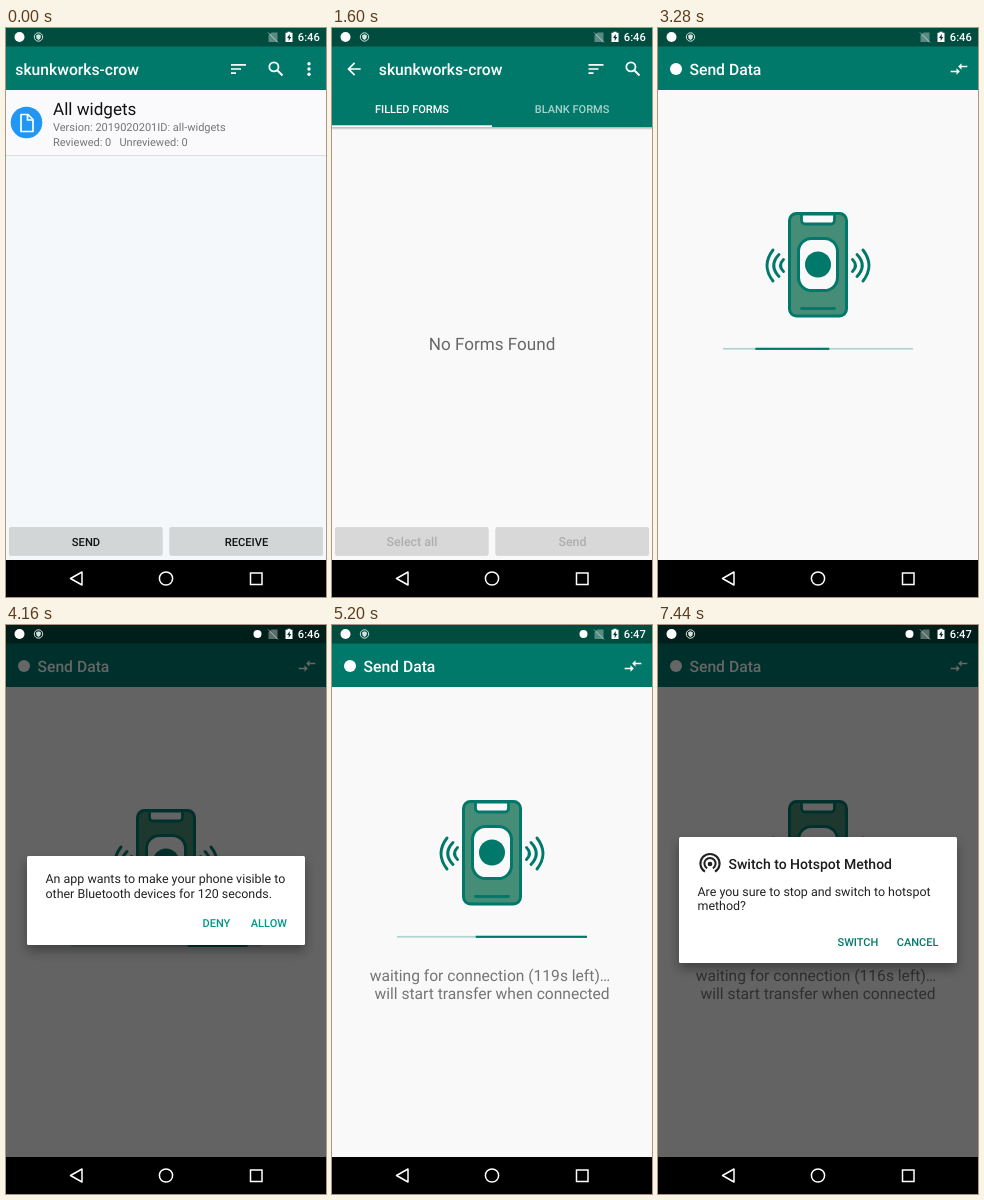
An HTML page that plays this animation: 320x569 px, repeating every 8000 ms.

```html
<!DOCTYPE html>
<html lang="en">
<head>
<meta charset="utf-8">
<title>Send Data</title>
<style>
  html, body { margin: 0; width: 100%; height: 100%; overflow: hidden; background: #000; }
  svg { display: block; }
  #stage { width: 100%; height: 100%; }
  text { font-family: Roboto, sans-serif; white-space: pre; text-rendering: geometricPrecision; }
</style>
</head>
<body>
<svg id="stage" viewBox="0 0 320 569"></svg>
<script>
const LOOP = 8000, STEP = 80;
const TEAL = '#00796b', PHONE = '#468d77';

// ---- markup helpers ----
const text = (x, y, size, str, fill, more = '') =>
  `<text x="${x}" y="${y}" font-size="${size}" fill="${fill}" ${more}>${str}</text>`;
const box = (x, y, w, h, fill, more = '') =>
  `<rect x="${x}" y="${y}" width="${w}" height="${h}" fill="${fill}" ${more}/>`;
const dot = (x, y, r, fill, more = '') =>
  `<circle cx="${x}" cy="${y}" r="${r}" fill="${fill}" ${more}/>`;
const line = (d, color, w, more = '') =>
  `<path d="${d}" fill="none" stroke="${color}" stroke-width="${w}" ${more}/>`;
const group = (id, body, more = '') => `<g id="${id}" ${more}>${body}</g>`;
const MID = 'text-anchor="middle"', BOLD = 'font-weight="500"';
const CENTER = `${MID} ${BOLD}`, ROUND = 'stroke-linecap="round"';

// 24-unit icons drawn at 20 px around a centre
const icon = (x, y, body) =>
  `<g transform="translate(${x - 10} ${y - 10}) scale(.833)">${body}</g>`;
const sortIcon = x => icon(x, 41, '<path fill="#fff" d="M3 18h6v-2H3zM3 6v2h18V6zM3 13h12v-2H3z"/>');
const searchIcon = x => icon(x, 41,
  dot(9.5, 9.5, 5.5, 'none', 'stroke="#fff" stroke-width="2.1"') + line('M13.8 13.8L19.8 19.8', '#fff', 2.3));
const swapIcon = icon(301, 41,
  '<path fill="#fff" d="M9 14H2v2h7v3l4-4-4-4zM15 13v-3h7V8h-7V5l-4 4z"/>');
const backIcon = icon(22, 41,
  '<path fill="#fff" d="M20 11H7.8l5.6-5.6L12 4l-8 8 8 8 1.4-1.4L7.8 13H20z"/>');

const barTitle = (x, str) => text(x, 46.5, 15.7, str, '#fff', BOLD);
const button = (id, x, label, size, fill, color) =>
  box(x, 499.5, 153.5, 28.5, '#000', 'rx="2" opacity=".12"') +
  box(x, 499, 153.5, 28, fill, 'rx="2"') +
  text(x + 77, 517.6, size, label, color, `${CENTER} id="${id}Text"`) +
  box(x, 499, 153.5, 28, '#000', `rx="2" opacity="0" id="${id}Press"`);

const formCard = y =>
  box(0, y, 320, 65, '#fafafd') + box(0, y + 65, 320, 1, '#dcdde0') +
  dot(20.5, y + 32.5, 15.8, '#2196f3') +
  line(`M15 ${y + 24.5}h7l5 5v12h-12zM21.5 ${y + 24.5}v5.500h5.500`, '#fff', 1.7, 'stroke-linejoin="round"') +
  text(47, y + 25, 17.1, 'All widgets', '#111') +
  text(47, y + 41, 11, 'Version: 2019020201ID: all-widgets', '#757575');

// ---- screens ----
const home = box(0, 18, 320, 514, '#f4f8fa') + box(0, 18, 320, 44, TEAL) +
  barTitle(9.3, 'skunkworks-crow') + sortIcon(232.5) + searchIcon(270) +
  [35.8, 41, 46.200].map(y => dot(303, y, 1.7, '#fff')).join('') +
  formCard(62) + text(47, 118, 11, 'Reviewed: 0   Unreviewed: 0', '#757575') +
  button('homeSend', 3, 'SEND', 11.2, '#d3d6d7', '#111') +
  button('receive', 163.5, 'RECEIVE', 11.2, '#d3d6d7', '#111');

const forms = box(0, 18, 320, 514, '#f9f9f9') +
  group('pages',
    text(160, 322, 17.1, 'No Forms Found', '#686868', MID) +
    `<g transform="translate(320)">${formCard(99)}` +
    box(288.5, 125.500, 13, 13, 'none', 'rx="1.5" stroke="#757575" stroke-width="1.8" id="unchecked"') +
    group('checked', box(287.5, 124.500, 15, 15, '#009688', 'rx="2"') +
      line('M290.500 132l3.300 3.300 6-6.500', '#fff', 1.8)) + '</g>') +
  box(0, 99, 320, 3, 'url(#shade)') + box(0, 18, 320, 81, TEAL) +
  backIcon + barTitle(46.8, 'skunkworks-crow') + sortIcon(264) + searchIcon(301) +
  text(80, 85.2, 11, 'FILLED FORMS', '#fff', `${CENTER} id="filled"`) +
  text(240, 85.2, 11, 'BLANK FORMS', '#fff', `${CENTER} id="blank"`) +
  box(0, 97.3, 160, 1.8, '#fff', 'id="tab"') +
  button('all', 3, 'Select all', 12.44, '#d8d8d8', '#aeaeae') +
  button('formSend', 163.5, 'Send', 12.44, '#d8d8d8', '#aeaeae');

const waves = ['M205 222Q217 237.500 205 253', 'M199 226.500Q209.500 237.500 199 248.500', 'M194.500 231.500Q200.500 237.500 194.500 243.500']
  .map(d => line(d, TEAL, 2.9, ROUND)).join('');
const edge = w => `stroke="${TEAL}" stroke-width="${w}"`;
const phone = waves + `<g transform="translate(320) scale(-1 1)">${waves}</g>` +
  box(131.5, 185.5, 57, 102.5, PHONE, `rx="7" ${edge(3)}`) +
  `<path d="M143.500 186v6q0 4 4 4h25q4 0 4-4v-6z" fill="#f9f9f9" ${edge(2.8)}/>` +
  box(140.5, 210.5, 39, 52, '#f9f9f9', `rx="13" ${edge(3)}`) +
  dot(160, 236.5, 13, TEAL) + line('M143.500 280.500h33', TEAL, 2.8, ROUND) +
  `<svg x="65" y="319.500" width="190" height="2.400">${box(0, .3, 190, 1.8, '#b0d3cf')}` +
  box(0, 0, 0, 2.4, TEAL, 'id="bar1"') + box(0, 0, 0, 2.4, TEAL, 'id="bar2"') + '</svg>';

const send = box(0, 18, 320, 514, '#f9f9f9') + box(0, 18, 320, 44, TEAL) +
  dot(18, 41, 6, '#fff') + barTitle(31.5, 'Send Data') +
  dot(301, 41, 16, '#fff', 'id="swapPress" opacity="0"') + swapIcon + group('phone', phone) +
  group('wait', text(37.7, 356.3, 15.6, '', '#757575', 'id="count"') +
    text(42.5, 374.3, 15.6, 'will start transfer when connected', '#757575'));

const panel = (y, h) => box(21, y, 278, h, '#fff', 'rx="1.5" filter="url(#shadow)"');
const visibleDialog = panel(231, 89) +
  text(39.5, 258, 12.44, 'An app wants to make your phone visible to', '#222') +
  text(39.5, 272.6, 12.44, 'other Bluetooth devices for 120 seconds.', '#222') +
  box(238, 286, 50, 25, '#000', 'rx="2" opacity="0" id="allowPress"') +
  text(196.5, 302.4, 11, 'DENY', '#009688', BOLD) + text(244.8, 302.4, 11, 'ALLOW', '#009688', BOLD);

const ring = (r, cut) => {
  const x = r * Math.sin(cut), y = r * Math.cos(cut);
  return line(`M${52 - x} ${238.5 + y}A${r} ${r} 0 1 1 ${52 + x} ${238.5 + y}`, '#222', 2);
};
const switchDialog = panel(212, 126) + ring(9.6, .55) + ring(5.6, .55) + dot(52, 239, 2.3, '#222') +
  text(70.5, 244, 14, 'Switch to Hotspot Method', '#1c1c1c', BOLD) +
  text(39.5, 270.6, 12.44, 'Are you sure to stop and switch to hotspot', '#222') +
  text(39.5, 285.2, 12.44, 'method?', '#222') +
  text(179.5, 320.6, 11, 'SWITCH', TEAL, BOLD) + text(238.8, 320.6, 11, 'CANCEL', TEAL, BOLD);

const status = dot(13.5, 9, 5, '#fff') +
  dot(32.5, 9, 4.2, 'none', 'stroke="#d5e2df" stroke-width="1"') +
  '<path d="M32.500 6.300l2.300.9v1.700q0 2-2.300 3-2.300-1-2.300-3V7.200z" fill="#d5e2df"/>' +
  dot(251.5, 9, 4, '#fff', 'id="link"') +
  '<path d="M265.500 4.500h6v9.500h-9V7.500z" fill="#fff" opacity=".35"/>' +
  line('M262 4.500l10 10', '#fff', 1, 'opacity=".55"') +
  '<path d="M281.500 3.800h3v1h2V14h-7V4.800h2z" fill="#fff"/>' +
  '<path d="M283.700 6l-2.600 3.900h1.600v3l2.500-4h-1.500z" fill="#00352c"/>' +
  text(291.8, 13.2, 11.2, '', '#fff', `${BOLD} id="clock"`);

const nav = box(0, 532, 320, 37, '#000') +
  line('M76 544v13l-11.500-6.500z', '#fff', 1.5, 'stroke-linejoin="round"') +
  dot(160, 550.5, 6.6, 'none', 'stroke="#fff" stroke-width="1.5"') +
  box(244.5, 545, 11.5, 11.5, 'none', 'stroke="#fff" stroke-width="1.5"');

document.getElementById('stage').innerHTML =
  `<defs>
    <linearGradient id="shade" x2="0" y2="1"><stop stop-opacity=".3"/><stop offset="1" stop-opacity="0"/></linearGradient>
    <filter id="shadow" x="-15%" y="-25%" width="130%" height="160%">
      <feDropShadow dx="0" dy="6" stdDeviation="6" flood-opacity=".35"/></filter>
  </defs>` +
  group('home', home) + group('forms', forms) + group('send', send) + box(0, 0, 320, 18.5, '#004d40') +
  box(0, 0, 320, 532, '#000', 'id="dim"') +
  group('visible', visibleDialog) + group('switch', switchDialog) + status + nav;

// ---- motion ----
const el = {};
document.querySelectorAll('[id]').forEach(n => el[n.id] = n);
const set = (id, name, value) => el[id].setAttribute(name, value);
const show = (id, alpha) => {
  set(id, 'opacity', alpha);
  set(id, 'visibility', alpha > 0 ? 'visible' : 'hidden');
};
const ramp = (t, a, b) => Math.min(1, Math.max(0, (t - a) / (b - a)));
const pulse = (t, a) => .16 * ramp(t, a - 80, a + 80) * (1 - ramp(t, a + 160, a + 400));
const easeOut = x => 1 - (1 - x) ** 4;
const smooth = x => x * x * (3 - 2 * x);

function bezier(x, x1, y1, x2, y2) {
  const at = (s, a, b) => 3 * a * s * (1 - s) ** 2 + 3 * b * s * s * (1 - s) + s ** 3;
  let lo = 0, hi = 1;
  for (let i = 0; i < 22; i++) {
    const m = (lo + hi) / 2;
    if (at(m, x1, x2) < x) lo = m; else hi = m;
  }
  return at(lo, y1, y2);
}
// keys: [position, value, easing to the next key]
function follow(keys, p) {
  let i = 0;
  while (i < keys.length - 2 && p >= keys[i + 1][0]) i++;
  const [a, from, ease] = keys[i], [b, to] = keys[i + 1];
  const x = ramp(p, a, b);
  return from + (to - from) * (ease ? bezier(x, ...ease) : x);
}
const bars = {
  bar1: {
    mid: [[0, -.952], [.2, -.952, [.5, 0, .7, .496]], [.5915, -.115, [.302, .381, .55, .956]], [1, 1.054]],
    size: [[0, .08], [.3665, .08, [.335, .125, .786, 1]], [.6915, .661, [.06, .11, .6, 1]], [1, .08]]
  },
  bar2: {
    mid: [[0, -.049, [.15, 0, .515, .41]], [.25, .328, [.31, .284, .8, .734]], [.4835, .795, [.4, .627, .6, .902]], [1, 1.554]],
    size: [[0, .08], [.27, .389], [.37, .521], [.49, .728], [1, .08]]
  }
};

function enter(id, t, start) {
  show(id, ramp(t, start, start + 160));
  set(id, 'transform', `translate(0 ${41 * (1 - easeOut(ramp(t, start, start + 280)))})`);
}

function draw(t) {
  enter('forms', t, 1200);
  enter('send', t, 2800);
  show('homeSendPress', pulse(t, 960));

  const page = smooth(ramp(t, 1760, 2080));
  set('pages', 'transform', `translate(${-320 * page})`);
  set('tab', 'x', 160 * page);
  set('filled', 'opacity', 1 - .35 * page);
  set('blank', 'opacity', .65 + .35 * page);
  const picked = t >= 2320;
  show('checked', picked ? 1 : 0);
  show('unchecked', picked ? 0 : 1);
  el.allText.textContent = picked ? 'Clear all' : 'Select all';
  set('allText', 'fill', page > .5 ? '#222' : '#aeaeae');
  set('formSendText', 'fill', picked ? '#222' : '#aeaeae');
  show('formSendPress', pulse(t, 2640));

  const p = (Math.max(0, t - 2848) / 1600) % 1;
  for (const id in bars) {
    const w = follow(bars[id].size, p);
    set(id, 'x', 190 * (follow(bars[id].mid, p) - w / 2));
    set(id, 'width', 190 * w);
  }

  const waiting = t >= 5040;
  set('phone', 'transform', `translate(0 ${waiting ? -9 : 0})`);
  show('wait', waiting ? 1 : 0);
  el.count.textContent = `waiting for connection (${119 - Math.floor(Math.max(0, t - 5040) / 800)}s left)…`;
  el.clock.textContent = t < 4640 ? '6:46' : '6:47';
  show('link', t >= 3600 ? 1 : 0);

  show('allowPress', pulse(t, 4400));
  show('swapPress', pulse(t, 6400));
  show('visible', ramp(t, 3680, 3840) * (1 - ramp(t, 4560, 4720)));
  show('switch', ramp(t, 6600, 6800));
  show('dim', .6 * Math.max(ramp(t, 3720, 3920) * (1 - ramp(t, 4560, 4760)), ramp(t, 6640, 6840)));
}

const start = performance.now();
function tick() {
  const t = (performance.now() - start) % LOOP;
  draw(Math.floor(t / STEP) * STEP);
  requestAnimationFrame(tick);
}
tick();
</script>
</body>
</html>
```
